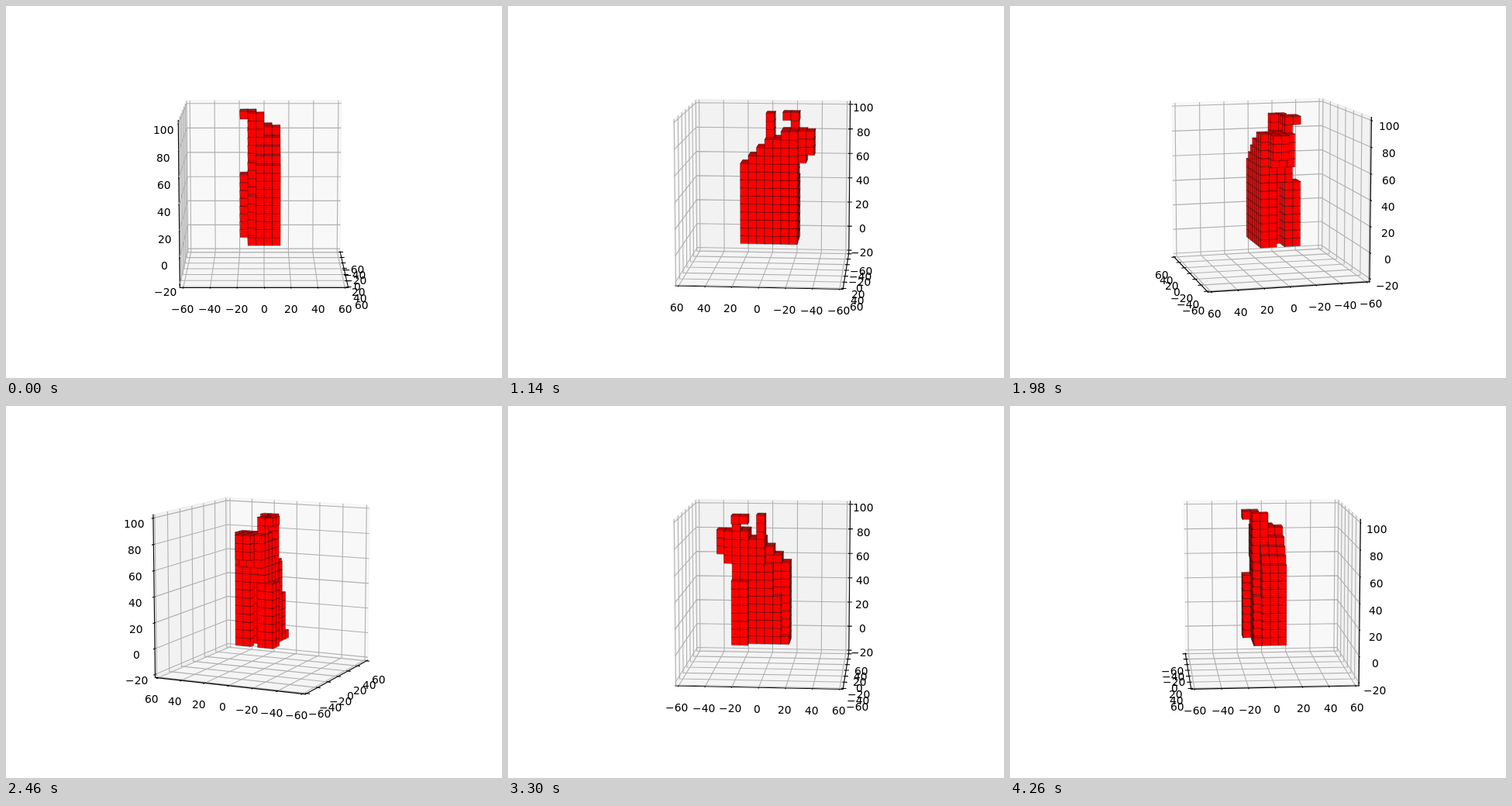
An HTML page with a canvas that plays this animation: 640x480 px, repeating every 4.32 s.

```html
<!DOCTYPE html>
<html lang="en">
<head>
<meta charset="utf-8">
<title>Rotating voxel plot</title>
<style>
html, body { margin: 0; width: 100%; height: 100%; overflow: hidden; background: #fff; }
canvas { display: block; width: 640px; height: 480px; }
</style>
</head>
<body>
<canvas id="plot" width="640" height="480"></canvas>
<script>
const ctx = document.getElementById('plot').getContext('2d');

const STEP_MS = 60, STEPS = 72;
const DIST = 10, SCALE = 369.6 / 0.185, CX = 333, CY = 237.4;
const ELEV = 10 * Math.PI / 180, CE = Math.cos(ELEV), SE = Math.sin(ELEV);
const CENTER = [0, 0, 40], SPAN = 120;
const LOW = CENTER.map(c => c - 62.5), HIGH = CENTER.map(c => c + 62.5);
const DELTA = 10, LABEL_GAP = 10.37;
const THIN = 1.11;

// axis index, tick direction, second axis flipped for the line start, pane grey
const AXES = [
  { i: 0, dir: 1, flip: 1, grey: 242 },
  { i: 1, dir: 0, flip: 0, grey: 230 },
  { i: 2, dir: 0, flip: 0, grey: 236 }
];

// x0, x1, y0, y1, z0, z1 in cells
const CELL = 6.25;
const BOXES = [
  [2, 3, -1, 2, 0, 10], [1, 2, -1, 2, 0, 11], [0, 1, -1, 2, 0, 12], [-2, 0, -2, 2, 0, 13],
  [-4, -2, -2, 2, 8, 14],
  [-4, -2, -3, -1, 0, 8], [-4, -2, 1, 2, 0, 8], [-4, -3, 0, 1, 0, 8],
  [2, 3, -2, -1, 0, 1], [1, 2, -2, -1, 0, 6], [0, 1, -2, -1, 0, 10],
  [-5, -4, -2, 1, 10, 14], [-6, -5, -1, 1, 11, 14],
  [-1, 0, -2, 0, 13, 16], [-4, -3, -2, -1, 14, 15], [-4, -2, -3, -1, 15, 16]
];

function buildCells() {
  const cells = new Map();
  for (const [x0, x1, y0, y1, z0, z1] of BOXES)
    for (let x = x0; x < x1; x++)
      for (let y = y0; y < y1; y++)
        for (let z = z0; z < z1; z++) cells.set([x, y, z].join(), [x, y, z]);
  return [...cells.values()].map(pos => {
    const faces = [];
    for (let axis = 0; axis < 3; axis++)
      for (const side of [0, 1]) {
        const next = pos.slice();
        next[axis] += side ? 1 : -1;
        if (!cells.has(next.join())) faces.push(makeFace(pos, axis, side));
      }
    return { mid: pos.map(v => (v + 0.5) * CELL), faces };
  }).filter(c => c.faces.length);
}

function makeFace(pos, axis, side) {
  const a = (axis + 1) % 3, b = (axis + 2) % 3;
  const corners = [[0, 0], [1, 0], [1, 1], [0, 1]].map(([u, v]) => {
    const p = pos.slice();
    p[axis] += side;
    p[a] += u;
    p[b] += v;
    return p.map(n => n * CELL);
  });
  return { axis, side, level: corners[0][axis], corners };
}

const cells = buildCells();
let cosA = 1, sinA = 0;

function project(p) {
  const [x, y, z] = p.map((v, i) => (v - CENTER[i]) / SPAN);
  const ground = cosA * x + sinA * y;
  const k = SCALE / (DIST - CE * ground - SE * z);
  return [CX + k * (cosA * y - sinA * x), CY - k * (CE * z - SE * ground)];
}

function trace(points) {
  ctx.beginPath();
  points.forEach(([x, y]) => ctx.lineTo(x, y));
}

function line(points, color, cap) {
  const pts = points.map(project);
  // straight two-point lines sit on whole pixels
  if (pts.length === 2)
    for (const k of [0, 1])
      if (Math.abs(pts[0][k] - pts[1][k]) < 1e-4)
        pts.forEach(p => { p[k] = Math.floor(p[k]) + 0.5; });
  trace(pts);
  ctx.lineWidth = THIN;
  ctx.lineCap = cap;
  ctx.strokeStyle = color;
  ctx.stroke();
}

function put(point, index, value) {
  const p = point.slice();
  p[index] = value;
  return p;
}

function drawPane({ i, grey }, back, front) {
  const a = (i + 1) % 3, b = (i + 2) % 3;
  const near = put(back, a, front[a]);
  trace([back, near, put(near, b, front[b]), put(back, b, front[b])].map(project));
  ctx.closePath();
  ctx.fillStyle = ctx.strokeStyle = `rgba(${grey},${grey},${grey},0.5)`;
  ctx.lineWidth = 1.39;
  ctx.fill();
  ctx.stroke();
}

function drawLabel(value, at) {
  const text = String(value).replace('-', '\u2212');
  const [x, y] = project(at);
  ctx.fillText(text, Math.round(x - ctx.measureText(text).width / 2), Math.round(y + 11));
}

function drawAxis({ i, dir, flip }, back, front) {
  const start = put(back, flip, front[flip]);
  line([start, put(start, i, front[i])], '#000', 'square');

  const ticks = Array.from({ length: 7 }, (_, n) => CENTER[i] - 60 + 20 * n);
  const a = (i + 1) % 3, b = (i + 2) % 3;
  for (const v of ticks) {
    const p = put(back, i, v);
    line([put(p, a, front[a]), p, put(p, b, front[b])], '#b0b0b0', 'butt');
  }

  const sign = back[dir] > CENTER[dir] ? 1 : -1;
  ctx.fillStyle = '#000';
  for (const v of ticks) {
    const p = put(start, i, v);
    line([
      put(p, dir, p[dir] + 0.1 * sign * DELTA),
      put(p, dir, p[dir] - 0.2 * sign * DELTA)
    ], '#000', 'square');
    drawLabel(v, p.map((c, k) => k === i ? c : c + (c < CENTER[k] ? -LABEL_GAP : LABEL_GAP)));
  }
}

function drawCells() {
  const eye = [CE * cosA, CE * sinA, SE].map((v, i) => CENTER[i] + v * DIST * SPAN);
  const range = c => Math.hypot(...c.mid.map((v, i) => v - eye[i]));
  const sorted = cells.map(c => [range(c), c]).sort((p, q) => q[0] - p[0]);
  ctx.fillStyle = '#f00';
  ctx.strokeStyle = '#000';
  ctx.lineWidth = 0.4;
  for (const [, cell] of sorted)
    for (const { axis, side, level, corners } of cell.faces) {
      if ((eye[axis] > level) !== (side === 1)) continue;
      trace(corners.map(project));
      ctx.closePath();
      ctx.fill();
      ctx.stroke();
    }
}

function draw(step) {
  const azim = step * 2 * Math.PI / STEPS;
  cosA = Math.cos(azim);
  sinA = Math.sin(azim);
  ctx.fillStyle = '#fff';
  ctx.fillRect(0, 0, 640, 480);
  ctx.font = '13.89px "DejaVu Sans", sans-serif';
  ctx.lineJoin = 'round';

  const flipped = [cosA, sinA, SE].map(v => v < -1e-9);
  const back = flipped.map((f, i) => f ? HIGH[i] : LOW[i]);
  const front = flipped.map((f, i) => f ? LOW[i] : HIGH[i]);
  AXES.forEach(axis => drawPane(axis, back, front));
  AXES.forEach(axis => drawAxis(axis, back, front));
  drawCells();
}

const began = performance.now();
let shown = -1;

function tick() {
  const step = Math.floor((performance.now() - began) / STEP_MS) % STEPS;
  if (step !== shown) draw(shown = step);
  requestAnimationFrame(tick);
}
tick();
</script>
</body>
</html>
```
